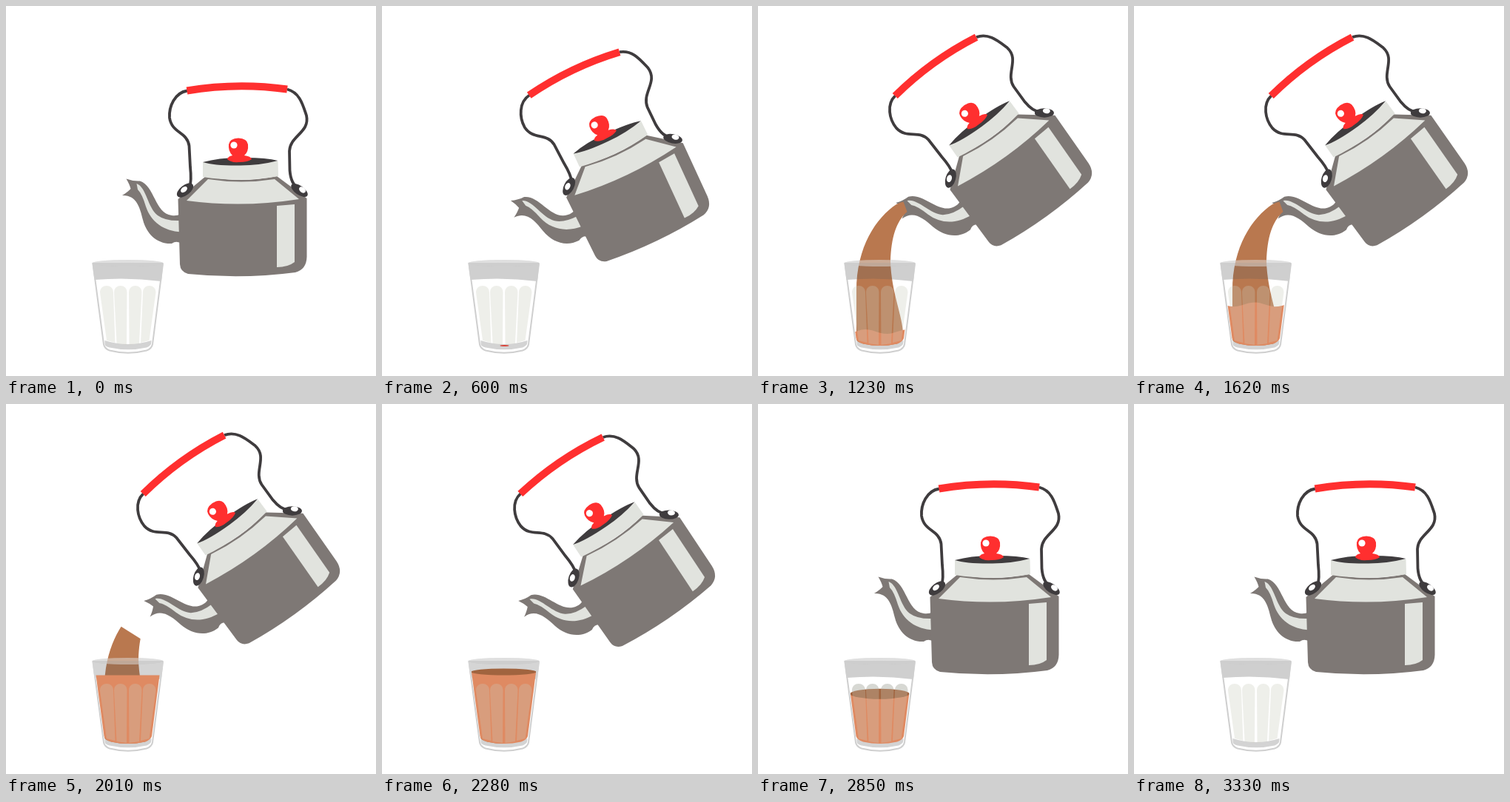
An HTML page that plays this animation: 500 by 500 pixels, repeating every 3360 ms.

```html
<!DOCTYPE html>
<html lang="en">
<head>
<meta charset="utf-8">
<title>Pouring tea</title>
<style>
html, body { margin: 0; width: 100%; height: 100%; overflow: hidden; background: #fff; }
svg { display: block; width: 100vw; height: 100vh; }
</style>
</head>
<body>
<svg viewBox="0 0 500 500">
  <defs>
    <clipPath id="inside">
      <path d="M120 355L132.500 449Q134 454 142 456.500Q165 461.500 188 456.500Q195.500 454 197 449L209 355Z"/>
    </clipPath>
    <clipPath id="wipe"><path id="wipeShape"/></clipPath>
    <path id="rim" d="M116.500 347L212.500 347L210 372Q165 366 119.500 370Z"/>
    <g id="flutes">
      <path d="M127 387C127 375 145 375 145 387L147.500 455L136 452Z"/>
      <path d="M146 387C146 375 163.500 375 163.500 387L163 458L149.500 456Z"/>
      <path d="M166 387C166 375 183.500 375 183.500 387L180 456L166.500 458Z"/>
      <path d="M185 387C185 375 202.500 375 202.500 387L193.500 452L182 455Z"/>
    </g>
  </defs>

  <g id="kettle">
    <!-- spout -->
    <path fill="#7e7875" d="M162.500 233.500Q172 237 181 236.500C201 243 201 280 224 283Q231 284 236 281L238 322Q231 316 224 321C204 322 190 308 185 289C181 272 176 255 157 256Q165 251 168.500 247Q167 241 162.500 233.500Z"/>
    <path fill="#e1e3de" d="M176.500 240C190 245 191 272 205 283Q216 291 236 290L237 305.500C213 304 196 292 189 271Q184 254 178 248Z"/>
    <!-- body -->
    <path fill="#7e7875" d="M232.500 261L270 230Q317 240 366 230L406.500 260L406.500 339Q406 356 391 360Q319 369.500 246 362Q235.500 359 235 349Z"/>
    <path fill="#e1e3de" d="M273 234Q318 241 363 234L396 261Q320 273 244 263Z"/>
    <path fill="#e1e3de" d="M366 270L390 268L390 346Q381 353 366 353Z"/>
    <!-- neck, lid, knob -->
    <path fill="#e1e3de" d="M266 211L367.500 210L368 230Q317 239 266 231Z"/>
    <path fill="#3f3c3e" d="M266 211Q290 204.500 317 205Q350 204.500 367.500 209Q342 215.500 317 215.500Q282 216 266 211Z"/>
    <path fill="#ff2f2f" d="M306 202Q300 196 301 187Q302 179 314 178.500Q326 179 327 187Q328 197 322 202Q331 203 332 207Q327 211 315 211Q304 212 299 207Q300 203 306 202Z"/>
    <circle cx="308" cy="188" r="4.600" fill="#fff"/>
    <!-- handle -->
    <g fill="none" stroke="#3f3c3e" stroke-width="3.800">
      <path d="M245 114.500C228 117 220 136 221 151C224 172 245 170 247.500 189L249 218Q251 236 248 245"/>
      <path d="M380 112.500C397 117 401 133 406 148C411 171 384 175 383 196L383.500 222Q385 241 395 246"/>
    </g>
    <path fill="none" stroke="#ff2f2f" stroke-width="10" d="M244.500 114.500Q312 103 380 112.500"/>
    <g fill="#3f3c3e">
      <ellipse cx="242" cy="249" rx="13" ry="6.800" transform="rotate(-38 242 249)"/>
      <ellipse cx="396.500" cy="249" rx="13" ry="6.200" transform="rotate(35 396.500 249)"/>
    </g>
    <g fill="#fff">
      <ellipse cx="240.500" cy="248" rx="5" ry="3.400" transform="rotate(-40 240.500 248)"/>
      <ellipse cx="400.500" cy="248.500" rx="5" ry="3.500" transform="rotate(38 400.500 248.500)"/>
    </g>
  </g>

  <!-- glass, back -->
  <path fill="#fff" stroke="#cfcfcf" stroke-width="2" d="M117.500 348L132 457Q133 463 140 465.500Q165 472 190 465.500Q197 463 198 457L212 348"/>
  <use id="band" href="#rim"/>
  <path fill="#d3d3d3" d="M133.500 452Q165 462 196.500 452L196 457Q194 460 190 461.500Q165 467 140 461.500Q134 460 133.500 457Z"/>
  <ellipse cx="164.500" cy="347.500" rx="48" ry="4.500" fill="#dfdfdf"/>
  <use id="shade" href="#flutes" fill="#d6d6d6"/>

  <!-- tea -->
  <g clip-path="url(#wipe)">
    <path fill="#b9784f" d="M196.500 264.500Q192 265 187 268C160 286 133 325 133 385L133 451Q134 454 142 456.500Q165 461.500 188 456.500Q195 454 196 446C197 422 180 388 179 345C180 312 187 291 201.500 278Z"/>
  </g>
  <use href="#rim" fill="#5a5a5a" opacity=".25"/>
  <ellipse id="drop" cx="165.500" cy="459" ry="1.100" fill="#d8453a"/>
  <g clip-path="url(#inside)">
    <path id="tea" fill="#df8a62"/>
    <ellipse id="top" cx="164.500" fill="#a1643f"/>
  </g>

  <!-- glass, front -->
  <use href="#flutes" fill="#cacbbd" opacity=".3"/>
  <ellipse cx="164.500" cy="347.500" rx="48" ry="4.500" fill="#dfdfdf" opacity=".5"/>
</svg>
<script>
const LOOP = 3360, FULL = 362, EMPTY = 459;
const el = id => document.getElementById(id);
const set = (id, attrs) => {
  for (const k in attrs) el(id).setAttribute(k, attrs[k]);
};
const part = (t, a, b) => Math.min(1, Math.max(0, (t - a) / (b - a)));
const cubic = u => u < .5 ? 4 * u ** 3 : 1 - 4 * (1 - u) ** 3;
const sine = u => (1 - Math.cos(Math.PI * u)) / 2;
const mix = (a, b, u) => a + (b - a) * u;

function tilt(t) {
  const a = 35 * (cubic(part(t, 293, 823)) - cubic(part(t, 2165, 2695)));
  const dx = 2.2 * (a / 35) ** 4;
  const dy = -(.02 * a * a + .33 * a);
  set('kettle', { transform: `translate(${dx} ${dy}) rotate(${-a} 282 233.5)` });
}

// The stream shows between two slanted edges that run down it.
function stream(t) {
  const tail = mix(235, 510, part(t, 1880, 2370));
  const head = mix(235, 510, part(t, 800, 1050));
  const at = (x, y) => `${x} ${y + (x - 168) * .63}`;
  set('wipeShape', {
    d: `M${at(100, tail)}L${at(240, tail)}L${at(240, head)}L${at(100, head)}Z`
  });
}

function tea(t) {
  const fill = part(t, 1030, 2060) - sine(part(t, 2560, 3340));
  const y = mix(EMPTY, FULL, fill);
  const wave = 3 * part(t, 1030, 1150) * (1 - part(t, 1600, 2000));
  let d = 'M110 470';
  for (let x = 110; x <= 220; x += 5)
    d += `L${x} ${y + wave * Math.sin(x / 9 + t / 90)}`;
  set('tea', { d: d + 'L220 470Z', visibility: fill > .001 ? 'visible' : 'hidden' });

  const low = y - FULL;
  set('top', {
    cy: y,
    rx: Math.max(0, 44 - low * .13),
    ry: Math.min(7, 4.5 + low * .09) * part(fill, 0, .08),
    opacity: part(t, 2060, 2250)
  });
  set('drop', { rx: t < 1040 ? 6 * part(t, 480, 600) + 12 * part(t, 600, 1000) : 0 });

  const grey = Math.round(mix(246, 255, part(fill, .75, 1)));
  set('band', { fill: `rgb(${grey},${grey},${grey})` });
  set('shade', { opacity: .8 * part(t, 2450, 2650) * (1 - part(t, 2900, 3300)) });
}

function draw(now) {
  const t = now % LOOP;
  tilt(t);
  stream(t);
  tea(t);
}

const start = performance.now();
function tick() {
  draw(performance.now() - start);
  requestAnimationFrame(tick);
}
tick();
</script>
</body>
</html>
```
